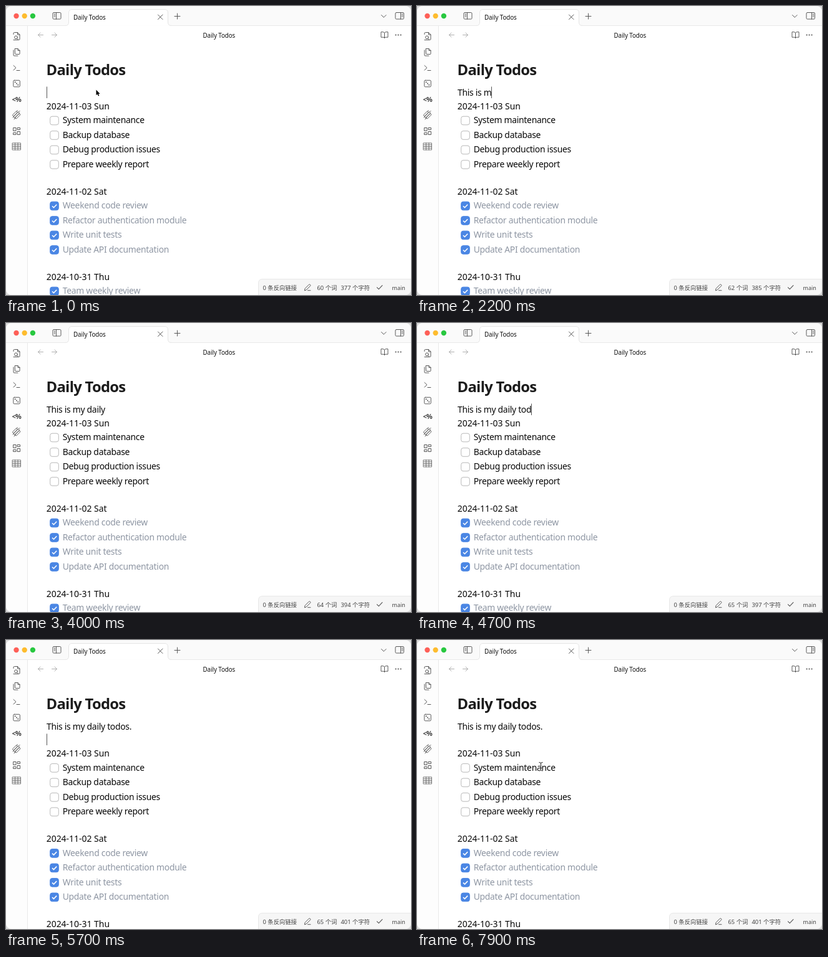
These frames come from a looping animation (649 px wide and 464 px high, 8 s). An HTML page:

```html
<!DOCTYPE html>
<html lang="en">
<head>
<meta charset="utf-8">
<style>
  html, body { margin: 0; width: 100%; height: 100%; overflow: hidden; background: #dcdcdc; }
  svg { display: block; border-radius: 9px; background: #fff; }
  text { font: 13.9px "Noto Sans", "Open Sans", sans-serif; letter-spacing: -.28px; fill: #080808; white-space: pre; }
  .title { font-size: 23.8px; font-weight: 700; letter-spacing: -.7px; fill: #1c1c1c; }
  .date { font-size: 13.95px; letter-spacing: 0; }
  .done { fill: #8e96a3; }
  .tab { font-size: 9.85px; letter-spacing: -.1px; fill: #111; }
  .status text { font: 9.4px "Noto Sans", "Noto Sans CJK SC", "Noto Sans CJK", sans-serif; letter-spacing: 0; fill: #444; }
  .status .branch { font-size: 9px; }
  .icons { fill: none; stroke: #5a5a5a; stroke-linecap: round; stroke-linejoin: round; }
  .code { font-size: 10.8px; font-weight: 600; letter-spacing: -.8px; fill: #444; stroke: none; }
  .dot { fill: #555; stroke: none; }
</style>
</head>
<body>
<svg width="649" height="464" viewBox="0 0 649 464">
  <!-- window chrome -->
  <path fill="#fafafa" d="M0 0H649V31.5H0z"/>
  <path fill="#fdfdfd" d="M0 32H34V464H0z"/>
  <path fill="none" stroke="#e9e9e9" d="M0 31.5H95M265 31.5H649M34.5 32V464"/>
  <path fill="#fff" stroke="#e5e5e5" d="M95 31.5Q100.500 31.5 100.500 26V11Q100.500 5.500 106 5.500H254Q259.500 5.500 259.500 11V26Q259.500 31.500 265 31.500"/>
  <circle cx="16.500" cy="16" r="4.200" fill="#fe5f57"/>
  <circle cx="29.700" cy="16" r="4.200" fill="#febc2e"/>
  <circle cx="42.900" cy="16" r="4.200" fill="#28c840"/>
  <text class="tab" x="108" y="22">Daily Todos</text>
  <text class="tab" x="315.500" y="50.500">Daily Todos</text>

  <g class="icons">
    <rect x="75" y="10.500" width="13" height="10.500" rx="1.500"/>
    <path d="M80.500 10.500V21M77.300 13H78.700M77.300 15H78.700M77.300 17H78.700"/>
    <rect x="624" y="10.500" width="13.500" height="10.500" rx="1.500"/>
    <path d="M632.500 10.500V21M634.300 13H635.700M634.300 15H635.700M634.300 17H635.700"/>
    <path d="M243.500 14L251 21.500M251 14L243.500 21.500M270 16.500H279M274.500 12V21M601.500 14.500L605.300 18.300 609.100 14.500"/>
    <path stroke="#b0b0b0" d="M59.500 46.500H51.500M55 43L51.500 46.500 55 50M73.500 46.500H81.500M78 43L81.500 46.500 78 50"/>
    <path d="M606.500 43.500Q606 41.700 604 41.700H601V50.200H604.500Q606.500 50.200 606.500 51.700Q606.500 50.200 608.500 50.200H612V41.700H609Q607 41.700 606.500 43.500V51.500"/>
    <g class="dot"><circle cx="624.600" cy="46.500" r="1.100"/><circle cx="628.600" cy="46.500" r="1.100"/><circle cx="632.600" cy="46.500" r="1.100"/></g>

    <!-- ribbon -->
    <path d="M12 45.500V44Q12 42.500 13.500 42.500H18.500L22 46V53Q22 54.500 20.500 54.500H12M18.500 42.500V46H22M17.800 52.300L19.300 53.800"/>
    <circle cx="16" cy="50.300" r="2.400"/>
    <path d="M14.500 68.500H19L22 71.500V76.500Q22 77.500 21 77.500H15.500Q14.500 77.500 14.500 76.500zM19 68.500V71.500H22M12 71V79Q12 80 13 80H19"/>
    <path d="M12 95.500L16 99.300 12 103M17 103.500H22"/>
    <rect x="11.800" y="119.300" width="10.500" height="10.500" rx="1.500"/>
    <g class="dot"><circle cx="14.700" cy="122.200" r="1"/><circle cx="17" cy="124.500" r="1"/><circle cx="19.300" cy="126.800" r="1"/></g>
    <text class="code" x="9.500" y="153.700">&lt;%</text>
    <path d="M10.500 175L16.500 169 18.500 171 12.500 177zM12.500 177L19.500 170 21.500 172 14 179.500zM14.500 179.500L21.500 172.500 23 174.500 17 180.500zM11 179L13 177M13 182L15 180M17 169L18.500 167.800M20 170.500L22 168.500"/>
    <path d="M12 195.500H16V200.500H12zM18.500 195.500H22.500V198.500H18.500zM18.500 201.500H22.500V206.500H18.500zM12 203.500H16V206.500H12z"/>
    <path stroke-width=".8" d="M10.500 220H23.500V231H10.500zM10.500 222.800H23.500M10.500 225.500H23.500M10.500 228.200H23.500M14.500 220V231M19 220V231"/>
  </g>

  <text class="title" x="64.500" y="111">Daily Todos</text>
  <text id="line" x="65" y="144.200"></text>
  <g id="list"></g>
  <path id="caret" stroke="#555" d="M.5 129.500V148"/>

  <g class="status">
    <path fill="#f6f6f6" stroke="#e8e8e8" d="M404.500 465V445Q404.500 438.500 411 438.500H650V465z"/>
    <text x="411.500" y="455.500">0 条反向链接</text>
    <text id="words" x="498.500" y="455.500"></text>
    <text id="chars" x="536.500" y="455.500"></text>
    <text class="branch" x="618.500" y="455.500">main</text>
    <g class="icons">
      <path d="M478.500 456.500L479.200 453.500 485.500 447.200Q486.500 446.500 487.500 447.500Q488.400 448.500 487.700 449.400L481.300 455.800zM483.500 456.700H488"/>
      <path stroke-width="1.200" d="M594.500 451.800L597.300 454.600 603 448.700"/>
    </g>
  </g>

  <path id="arrow" stroke="#fff" stroke-width="1.200" paint-order="stroke" d="M144.500 134.500v8.700l2-1.800 1.400 3.200 1.500-.7-1.400-3h2.600z"/>
  <g id="beam" fill="none"></g>
</svg>
<script>
const $ = id => document.getElementById(id);
const LOOP = 8000, LAG = 100, BLINK = 600, SHIFT = 21.4;
const TEXT = 'This is my daily todos.\n';
// time of each key press
const KEYS = [880, 1040, 1170, 1280, 1450, 1660, 1790, 1950, 2120, 2250, 2380, 2540, 2680,
  2880, 3000, 3130, 3290, 4180, 4370, 4560, 4740, 4930, 5190, 5580];

const DAYS = [
  [161, '2024-11-03 Sun', false, ['System maintenance', 'Backup database', 'Debug production issues', 'Prepare weekly report']],
  [298, '2024-11-02 Sat', true, ['Weekend code review', 'Refactor authentication module', 'Write unit tests', 'Update API documentation']],
  [435, '2024-10-31 Thu', true, ['Team weekly review']]
];

function todo(label, y, done) {
  const box = `<rect x="70.700" y="${y - 6.8}" width="13.600" height="13.600" rx="3.300" `;
  return (done
    ? box + `fill="#4a86e4" stroke="#4a86e4"/><path fill="none" stroke="#fff" stroke-width="1.600" d="M74 ${y + .2}l2.500 2.500 4.700-5"/>`
    : box + 'fill="#fff" stroke="#b9b9b9"/>')
    + `<text x="90.700" y="${y + 4.4}" class="${done ? 'done' : ''}">${label}</text>`;
}

$('list').innerHTML = DAYS.map(([y, date, done, items]) =>
  `<text class="date" x="64.700" y="${y + 4.6}">${date}</text>`
  + items.map((label, i) => todo(label, y + 23 + 23.5 * i, done)).join('')).join('');

// white halo below, dark stroke above
const BEAM = 'M-3-6.500Q0-6.500 0-5Q0-6.500 3-6.500M0-5V5.500M-3 7Q0 7 0 5.500Q0 7 3 7M-1.500 2.500H1.500';
$('beam').innerHTML = [['#fff', 2.2], ['#222', 1]].map(([color, width]) =>
  `<path stroke="${color}" stroke-width="${width}" d="${BEAM}"/>`).join('');

const typed = t => KEYS.filter(k => k <= t).length;
const show = (id, on) => $(id).setAttribute('visibility', on ? 'visible' : 'hidden');
const move = (id, x, y) => $(id).setAttribute('transform', `translate(${x} ${y})`);

function draw(t) {
  const n = typed(t), counted = TEXT.slice(0, typed(t - LAG));
  const newline = n === TEXT.length;
  $('line').textContent = TEXT.slice(0, n).replace('\n', '');
  move('list', 0, newline ? SHIFT : 0);

  const width = newline || !n ? 0 : $('line').getComputedTextLength();
  move('caret', 65 + Math.round(width), newline ? 21 : 0);
  const idle = t - (n ? KEYS[n - 1] : -200);
  show('caret', idle % (2 * BLINK) < BLINK);

  $('words').textContent = 60 + counted.split(/\s+/).filter(Boolean).length + ' 个词';
  $('chars').textContent = 377 + counted.length + ' 个字符';

  show('arrow', !n);
  show('beam', t >= 7600);
  const rest = (1 - Math.min(1, Math.max(0, (t - 7600) / 280))) ** 2;
  move('beam', 198.5 + 7 * rest, 203 + 3 * rest);
}

function frame() {
  draw(performance.now() % LOOP);
  requestAnimationFrame(frame);
}
frame();
</script>
</body>
</html>
```
